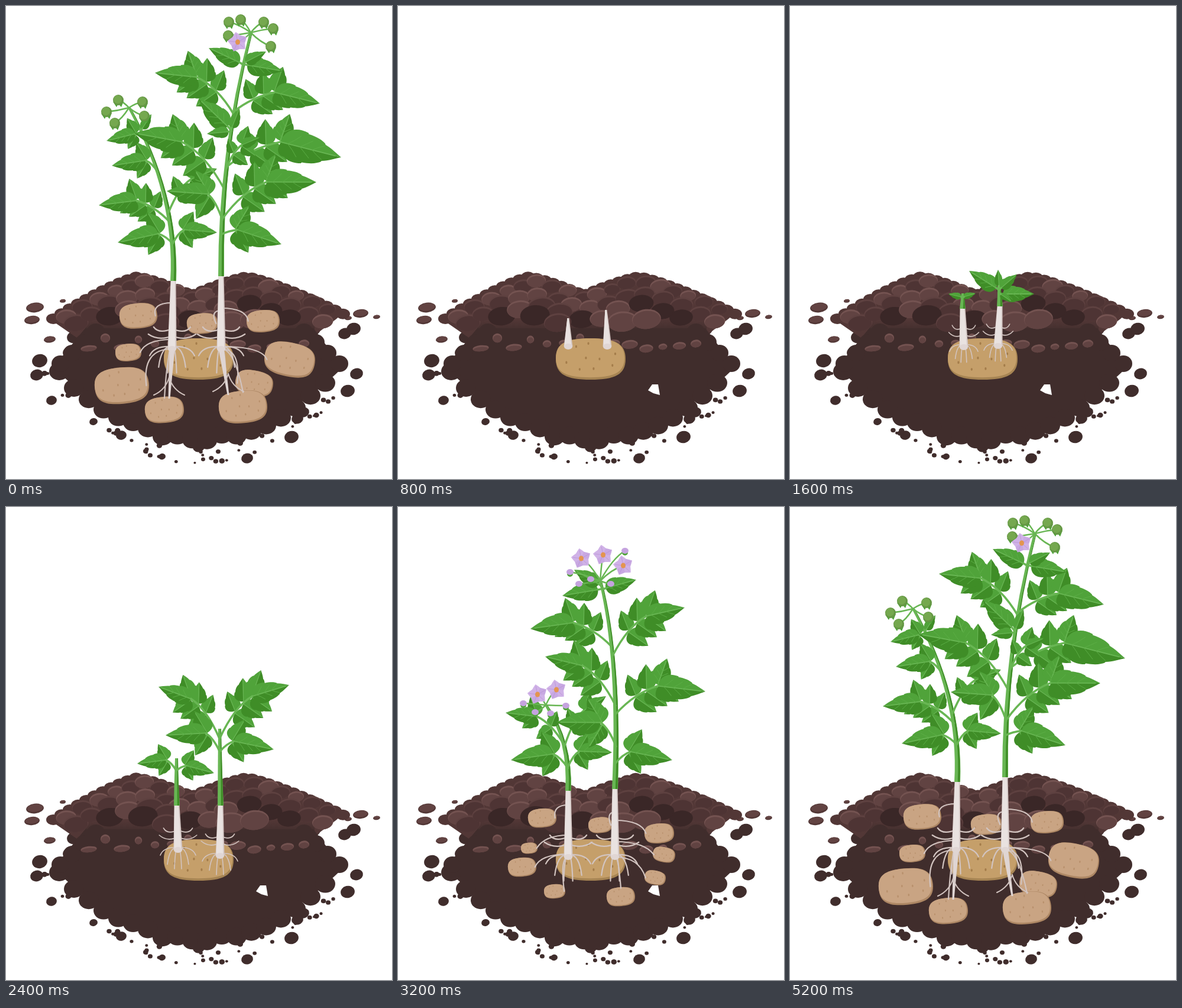
Recreate the animation shown at these times as an HTML page with a canvas. Size 653 by 800 pixels, loop 6000 ms.

```html
<!DOCTYPE html>
<html lang="en">
<head>
<meta charset="utf-8">
<title>Potato growth</title>
<style>
html, body { margin: 0; width: 100%; height: 100%; overflow: hidden; background: #fff; }
canvas { display: block; width: 100vw; height: 100vh; }
</style>
</head>
<body>
<canvas width="653" height="800"></canvas>
<script>
const c = document.querySelector('canvas').getContext('2d');
const LIGHT = '#50a33a', DARK = '#3f8d27', RIB = '#68b653', SOIL = '#402d2c', MOUND = '#523736', HAIR = '#d2c4c0';

let seed;
const rnd = () => (seed = seed * 16807 % 2147483647) / 2147483647;
const clamp = (v, lo, hi) => Math.max(lo, Math.min(hi, v));
const each = (list, n, fn) => {
  for (let i = 0; i < list.length; i += n) fn(...list.slice(i, i + n));
};

function oval(x, y, rx, ry, color, rot = 0) {
  c.fillStyle = color;
  c.beginPath();
  c.ellipse(x, y, rx, ry, rot, 0, 7);
  c.fill();
}

function poly(points, color) {
  c.fillStyle = color;
  c.beginPath();
  each(points, 2, (x, y) => c.lineTo(x, y));
  c.fill();
}

function curve(x0, y0, cx, cy, x1, y1, color, w) {
  c.strokeStyle = color;
  c.lineWidth = w;
  c.lineCap = 'round';
  c.beginPath();
  c.moveTo(x0, y0);
  c.quadraticCurveTo(cx, cy, x1, y1);
  c.stroke();
}

const bezier = (a, b, d, t) => (1 - t) ** 2 * a + 2 * t * (1 - t) * b + t * t * d;

// Upright bent strip that narrows from w0 to w1
function taper([x0, y0], [cx, cy], [x1, y1], w0, w1, color, shift = 0) {
  const w = (w0 + w1) / 2;
  c.fillStyle = color;
  c.beginPath();
  c.moveTo(x0 + shift - w0 / 2, y0);
  c.quadraticCurveTo(cx + shift - w / 2, cy, x1 + shift - w1 / 2, y1);
  c.lineTo(x1 + shift + w1 / 2, y1);
  c.quadraticCurveTo(cx + shift + w / 2, cy, x0 + shift + w0 / 2, y0);
  c.fill();
}

/* ---------- soil ---------- */
function ridge(x) {
  const d = Math.min(Math.abs(x - 222), Math.abs(x - 407));
  return 449 + 76 * (d / (x < 222 ? 150 : 190)) ** 1.25;
}
const floor = x => 745 - 120 * ((x - 325) / 245) ** 2;

const crumbs = [57,600,13, 52,624,11, 77,667,9, 108,586,12, 195,726,9, 326,746,10, 408,765,10, 483,729,12,
  503,687,10, 493,698,10, 578,651,12, 593,622,11, 573,554,11, 588,546,12, 115,560,12, 517,545,16, 148,703,7, 264,762,6];
const chips = [49,510,15, 44,531,13, 74,564,10, 600,520,13, 627,526,6, 579,528,6, 96,499,5];

function clod(x, y, a, b, tone) {
  oval(x, y, a, b, ['#3a2727', '#5e4140', '#745351'][tone], -.1);
  oval(x, y + 1.5, a - 1, b - 1.5, ['#3a2727', '#4e3434', '#614342'][tone], -.1);
}

function scatter() {
  each(crumbs, 3, (x, y, r) => oval(x, y, r, r * .85, SOIL, -.25));
  for (let i = 0; i < 44; i++) {
    const x = 65 + rnd() * 520, r = 2 + rnd() * 3;
    oval(x, floor(x) + 4 + rnd() * 26, r, r * .9, SOIL);
  }
  each(chips, 3, (x, y, r) => {
    oval(x, y, r, r * .55, MOUND, -.12);
    oval(x, y - 1, r * .9, r * .42, '#624342', -.12);
  });
}

function soil() {
  seed = 7;
  scatter();
  const heap = [], earth = [];
  for (let x = 80; x <= 570; x += 14) {
    heap.push(x, ridge(x) + 8);
    earth.push(x, floor(x) - 14);
    oval(x, ridge(x) + 9, 12, 9, MOUND);
  }
  poly([...heap, 558, 530, 515, 562, 140, 575, 82, 535], MOUND);
  poly([...earth, 520, 545, 134, 545], SOIL);
  for (let x = 90; x < 565; x += 25) oval(x, floor(x) - 17 + rnd() * 8, 17, 15, SOIL);
  for (const s of [-1, 1]) for (let i = 0; i < 4; i++) oval(328 + s * (236 - 20 * i), 605 - 18 * i, 15, 14, SOIL);
  const fade = c.createLinearGradient(0, 530, 0, 575);
  fade.addColorStop(0, '#402d2c00');
  fade.addColorStop(.5, SOIL);
  c.fillStyle = fade;
  c.fillRect(134, 530, 388, 60);
  for (let row = 0; row < 4; row++)
    for (let x = 100 + 13 * (row % 2); x < 560; x += 26 + 4 * row) {
      const y = ridge(x) + 13 + row * 20 + rnd() * 6, a = 13 + row * 3 + rnd() * 5;
      const tone = row < 2 ? 1 + (rnd() < .4) : Math.floor(rnd() * 3);
      if (y < 536) clod(x + rnd() * 8, y, a, a * .68, tone);
    }
  for (let x = 140; x < 510; x += 28) clod(x, 560 + rnd() * 20, 6 + rnd() * 8, 5 + rnd() * 3, 2);
  poly([423,650, 430,640, 440,640, 443,658, 432,655], '#fff');
}

/* ---------- tubers ---------- */
const eyes = [-.05,-.7, -.4,-.55, .72,-.2, -.12,0, .27,.05, -.68,.22, .64,.36, .1,.52, -.3,.55];

function tuberShape(a, b, color) {
  c.fillStyle = color;
  c.beginPath();
  c.moveTo(-a, 0);
  c.bezierCurveTo(-a, -b * .75, -a * .7, -b, 0, -b);
  c.bezierCurveTo(a * .7, -b, a, -b * .75, a, 0);
  c.bezierCurveTo(a, b * .75, a * .7, b, 0, b);
  c.bezierCurveTo(-a * .7, b, -a, b * .75, -a, 0);
  c.fill();
}

function tuber(x, y, a, b, tilt, fill, shade, eye) {
  c.save();
  c.translate(x, y);
  c.rotate(tilt);
  tuberShape(a, b, shade);
  c.translate(-1, -b * .05);
  tuberShape(a - 1, b * .94, fill);
  each(eyes, 2, (u, v) => oval(u * a, v * b, a / 50 + .4, b / 18 + .4, eye));
  c.restore();
}

function youngTuber(x, y, a) {
  const tilt = x > 405 && y > 580 ? .2 : -.09;
  tuber(x, y, a, a * .67, tilt, '#c9a483', '#ad8764', '#b8906c');
}

/* ---------- roots ---------- */
function hairs({ foot: [x, y], tap }, spread, w) {
  for (let k = -1; k <= 1; k += .4)
    curve(x, y - 4, x + k * spread * .8, y - 6, x + k * spread, y + spread * (1.1 - .8 * k * k), HAIR, w);
  for (const s of [-1, 1]) for (const h of [22, 34])
    curve(x, y - h, x + s * spread * .6, y - h + 9, x + s * spread * (1.5 - h / 50), y - h - 3, HAIR, w);
  if (!tap) return;
  const [u, v] = tap;
  taper([x, y], [(x + u) / 2, (y + v) / 2], tap, 9, 3, '#dfd5d3');
  for (const s of [-1, 1]) curve(u, v - 36, u + s * 6, v - 15, u + s * 26, v - 6, HAIR, 2);
}

// Runner from a stem to the near side of its tuber
function runner({ foot, neck }, x, y, a) {
  const sx = foot[0], sy = clamp(y - 22, neck[1] + 20, foot[1]), d = x - sx;
  const below = Math.abs(d) < a;
  curve(sx, sy, sx + d * .6, sy, below ? x : x - Math.sign(d) * a * .9, below ? y - a * .6 : y, HAIR, 2.2);
}

/* ---------- greenery ---------- */
const half = new Path2D('M0 0C.02-.9.2-1.2.4-1L.41-.93C.55-.9.65-.75.7-.6L.71-.53C.82-.4.92-.15 1 0Z');

function leaf(x, y, tx, ty, w) {
  const len = Math.hypot(tx - x, ty - y), up = tx < x ? -1 : 1;
  c.save();
  c.translate(x, y);
  c.rotate(Math.atan2(ty - y, tx - x));
  c.save();
  c.scale(len, w * up);
  c.fillStyle = LIGHT;
  c.fill(half);
  c.scale(1, -1);
  c.fillStyle = DARK;
  c.fill(half);
  c.restore();
  curve(0, 0, len / 2, 0, len * .9, 0, RIB, len > 45 ? 1.8 : 1.2);
  if (len > 45) for (const t of [.12, .32, .52]) for (const s of [-1, 1])
    curve(len * t, 0, len * (t + .1), s * w * .3, len * (t + .18), s * w * (.75 - t * .6), '#5cae46', .9);
  c.restore();
}

// Leaf stalk with n pairs of leaflets and one end leaf
function spray(x0, y0, tx, ty, n) {
  const dx = tx - x0, dy = ty - y0, dir = Math.sign(dx), dist = Math.hypot(dx, dy);
  const x1 = x0 + dx * [.1, .26, .46, .47][n], y1 = y0 + (n ? dy * .57 - Math.abs(dx) * .17 : dy * .15);
  const cx = x0 + (x1 - x0) * .45, cy = y0 + (y1 - y0) * .75;
  const size = n > 1 ? clamp(dist * .3, 32, 48) : dist * .45;
  const leaflet = (x, y, dx, dy, len) => {
    const k = len / Math.hypot(dx, dy);
    leaf(x, y, x + dx * k, y + dy * k, len * .36);
  };
  for (let i = 0; i < n; i++) {
    const q = n > 1 ? i / (n - 1) : 1, t = n > 1 ? .5 + .5 * q : .9;
    const x = bezier(x0, cx, x1, t), y = bezier(y0, cy, y1, t);
    leaflet(x, y + 2, dir * (n > 1 ? 1 : .6), n > 1 ? .7 : 1, size * .92);
    leaflet(x, y - 2, dir * (n > 1 ? .75 * q - .4 : .6), -1, size * (.8 + .2 * q));
  }
  leaf(x1, y1, tx, ty, Math.hypot(tx - x1, ty - y1) * .25);
  curve(x0, y0, cx, cy, x1, y1, RIB, 3.5);
}

function stemX({ neck, bend, tip }, y) {
  let lo = 0, hi = 1;
  for (let i = 0; i < 12; i++) {
    const t = (lo + hi) / 2;
    if (bezier(neck[1], bend[1], tip[1], t) > y) lo = t; else hi = t;
  }
  return bezier(neck[0], bend[0], tip[0], lo);
}

function plant(p) {
  const { foot, neck, bend, tip, sprays, blooms = [], buds = [], berries = [] } = p;
  const middle = [(foot[0] + neck[0]) / 2, (foot[1] + neck[1]) / 2], w = bend ? 9 : 3;
  taper(foot, middle, neck, 15, w, '#d5c8c6');
  taper(foot, middle, neck, 12, w * .75, '#e9e2e0', -.6);
  oval(...foot, 7, 5, '#e0d6d4');
  if (!bend) return;
  taper(neck, bend, tip, 10, 4, RIB);
  taper(neck, bend, tip, 3.5, 1, DARK, 2.5);
  each(sprays, 4, (y, tx, ty, n) => spray(stemX(p, y), y, tx, ty, n));
  each([...blooms, ...buds, ...berries], 2, (x, y) =>
    curve(...tip, (tip[0] + x) / 2, y + (tip[1] - y) * .25, x, y, RIB, 2.5));
  each(berries, 2, berry);
  each(buds, 2, bud);
  each(blooms, 2, flower);
}

function bud(x, y) {
  oval(x, y + 3, 5, 5, LIGHT);
  oval(x, y, 6, 5, '#c5a3df');
}

function flower(x, y) {
  const r = 16;
  c.save();
  c.translate(x, y);
  c.rotate(-.2);
  for (let i = 0; i < 5; i++) {
    c.fillStyle = i % 2 ? '#c8a8e2' : '#d0b2e7';
    c.beginPath();
    c.moveTo(0, 0);
    c.lineTo(-r * .48, -r * .58);
    c.quadraticCurveTo(-r * .25, -r * .85, 0, -r * 1.08);
    c.quadraticCurveTo(r * .25, -r * .85, r * .48, -r * .58);
    c.fill();
    curve(0, 0, 0, -r * .4, 0, -r * .85, '#b995d6', .8);
    c.rotate(Math.PI * .4);
  }
  c.restore();
  oval(x, y, 4, 4.5, '#e39550');
}

function berry(x, y) {
  poly([x - 9, y + 3, x - 3, y + 12, x, y + 6, x + 5, y + 12, x + 9, y + 2], LIGHT);
  oval(x, y, 9, 9, '#659744');
  oval(x - 1, y - 1, 7, 7, '#75a84f');
}

/* ---------- stages of growth ---------- */
// sprays: height on stem, leaf tip x and y, leaflet pairs
const stages = [
  {
    plants: [{ foot: [288,576], neck: [288,528] }, { foot: [354,576], neck: [352,514] }]
  },
  {
    spread: 24,
    plants: [
      { foot: [294,577], neck: [292,512], bend: [292,500], tip: [292,486],
        sprays: [493,268,487,0, 493,314,486,0] },
      { foot: [352,575], neck: [355,508], bend: [355,490], tip: [353,470],
        sprays: [482,303,448,0, 478,352,446,0, 487,413,487,0, 481,384,454,0, 485,375,500,0] }
    ]
  },
  {
    spread: 30,
    plants: [
      { foot: [291,580], neck: [289,505], bend: [288,465], tip: [288,425], sprays: [446,222,434,1, 446,352,450,1] },
      { foot: [362,590], neck: [363,505], bend: [362,440], tip: [361,375],
        sprays: [392,258,304,3, 392,479,301,3, 414,270,386,1, 414,453,410,1] }
    ]
  },
  {
    spread: 38,
    tubers: [244,526,24, 342,538,20, 442,552,25, 222,577,14, 450,588,19, 210,609,24, 435,627,18, 265,650,18, 377,659,24],
    plants: [
      { foot: [288,592], neck: [288,480], bend: [292,395], tip: [250,335],
        sprays: [402,182,348,2, 405,352,320,2, 442,191,428,1, 440,362,415,1],
        blooms: [236,317, 268,309], buds: [212,332, 284,336, 232,347, 258,349] },
      { foot: [367,592], neck: [367,477], bend: [376,260], tip: [342,125],
        sprays: [236,224,206,3, 252,485,170,3, 336,249,253,3, 350,520,312,3, 405,268,364,1, 433,464,428,1,
          138,278,150,0, 140,403,123,0, 135,298,106,0],
        blooms: [310,87, 347,81, 381,99], buds: [291,110, 326,122, 306,130, 360,130, 384,74] }
    ]
  },
  {
    spread: 38,
    tubers: [224,524,32, 332,537,26, 435,533,28, 207,586,22, 480,598,43, 196,642,46, 420,638,32, 268,683,33, 401,678,41],
    plants: [
      { foot: [281,580], tap: [276,664], neck: [283,465], bend: [290,320], tip: [208,172],
        sprays: [366,157,337,3, 402,189,400,1, 402,357,383,1, 350,357,275,2, 280,179,270,1, 226,170,228,1, 212,246,183,0],
        berries: [170,179, 190,159, 231,162, 234,186, 184,198] },
      { foot: [364,580], tap: [376,658], neck: [364,457], bend: [362,250], tip: [414,45],
        sprays: [272,567,256,3, 275,430,222,2, 183,252,113,3, 178,531,165,3, 360,525,298,3, 310,217,215,3,
          362,272,313,1, 386,466,403,1, 212,326,157,0, 212,340,216,0, 212,395,173,0, 100,343,71,0, 98,468,110,0, 98,440,77,0],
        berries: [377,27, 397,23, 436,27, 452,38, 448,68, 376,50], blooms: [392,61] }
    ]
  }
];

function draw({ plants, spread, tubers = [] }) {
  c.fillStyle = '#fff';
  c.fillRect(0, 0, 653, 800);
  soil();
  tuber(326, 597, 59, 35, 0, '#c59f6a', '#a68453', '#a37c4a');
  each(tubers, 3, youngTuber);
  each(tubers, 3, (x, y, a) => runner(plants[x < 326 ? 0 : 1], x, y, a));
  for (const p of plants) {
    if (spread) hairs(p, spread, tubers.length ? 2.2 : 1.6);
    plant(p);
  }
}

const order = [4, 0, 1, 2, 3, 4];
let shown = -1;
function tick() {
  const i = order[Math.min(5, Math.floor(performance.now() % 6000 / 800))];
  if (i !== shown) draw(stages[shown = i]);
  requestAnimationFrame(tick);
}
tick();
</script>
</body>
</html>
```
